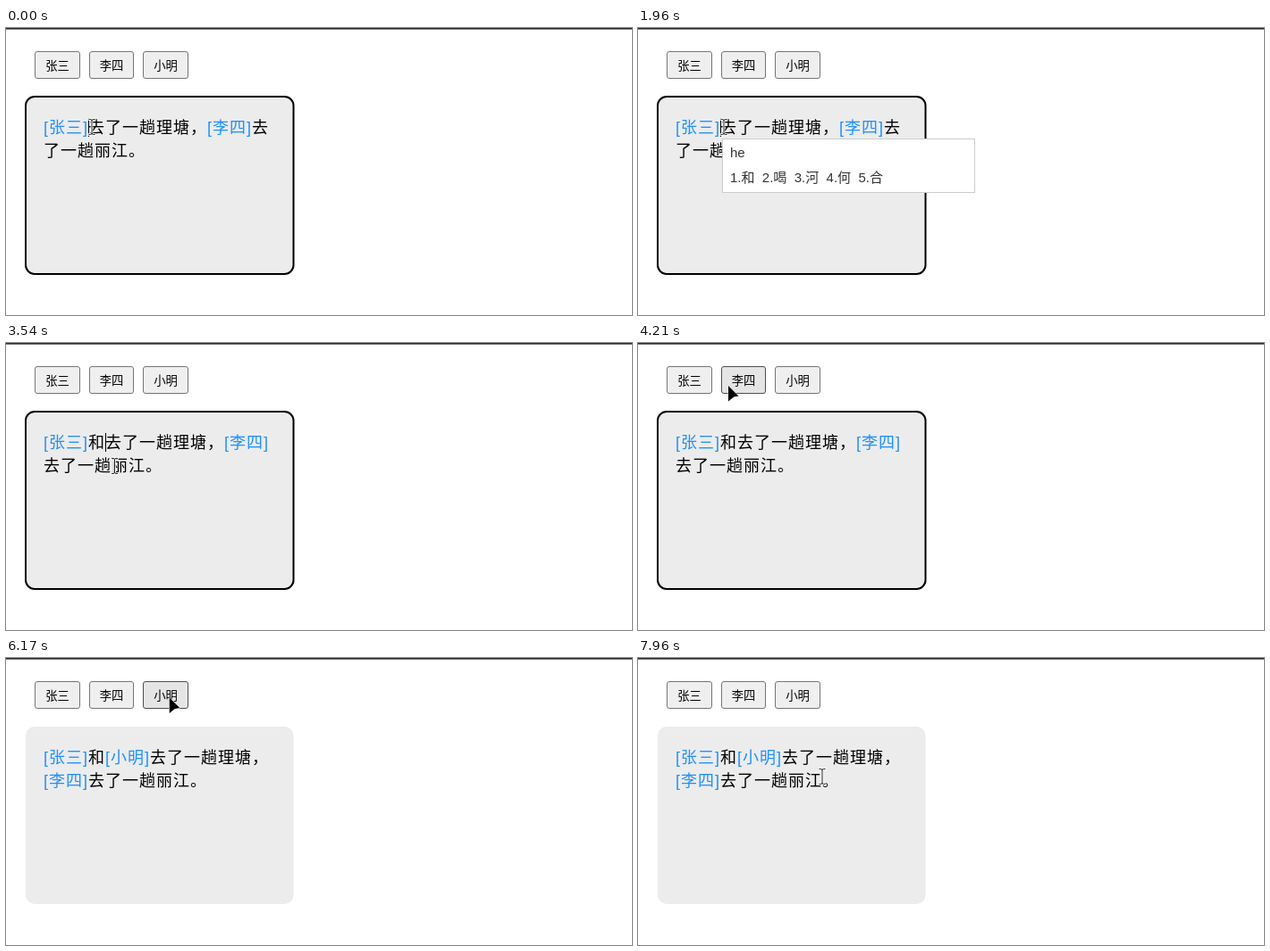
An HTML page for the animation above (8 s loop, 700 by 322 pixels).

```html
<!DOCTYPE html>
<html lang="zh-CN">
<head>
<meta charset="utf-8">
<title>Mention editor</title>
<style>
  html, body { margin: 0; width: 100%; height: 100%; overflow: hidden; background: #fff; }
  svg { display: block; width: 700px; height: 322px; }
  text { font-family: "Liberation Sans", "Noto Sans CJK SC", "Noto Sans CJK", sans-serif; white-space: pre; }
  .line { font-size: 18px; letter-spacing: 1px; fill: #000; }
  .mention { fill: #1e90ff; }
  .button text { font-size: 13.333px; text-anchor: middle; }
  .ime text { font-size: 15px; fill: #333; }
</style>
</head>
<body>
<svg id="stage" viewBox="0 0 700 322">
  <rect width="700" height="322" fill="#fff"/>
  <rect width="700" height="1.6" fill="#2b2b2b"/>
  <g id="buttons"></g>
  <rect id="editor" x="22" y="77" width="299.5" height="199" rx="10" fill="#ececec" stroke="#000" stroke-width="2"/>
  <text id="line1" class="line" x="42" y="117.5"></text>
  <text id="line2" class="line" x="42" y="143.5"></text>
  <rect id="caret" y="101" width="1" height="21"/>
  <g id="ime" class="ime">
    <rect id="panel" x="94.5" y="124.5" height="60" fill="#fff" stroke="#ccc"/>
    <text id="pinyin" x="103" y="145"></text>
    <text id="choices" x="103" y="173"></text>
  </g>
  <g id="beam" fill="none" stroke-linecap="square">
    <path d="M-3-8.5H-1.5Q0-8.5 0-7Q0-8.5 1.5-8.5H3M0-7V7M-3 8.5H-1.5Q0 8.5 0 7Q0 8.5 1.5 8.5H3" stroke="#fff" stroke-width="2.6"/>
    <path d="M-3-8.5H-1.5Q0-8.5 0-7Q0-8.5 1.5-8.5H3M0-7V7M-3 8.5H-1.5Q0 8.5 0 7Q0 8.5 1.5 8.5H3" stroke="#222" stroke-width="1"/>
  </g>
  <path id="arrow" d="M0 0L11.5 11.5L6 12.5L0 17.5Z" fill="#000" stroke="#fff" stroke-width="1" paint-order="stroke"/>
</svg>
<script>
const LOOP = 8000;
const IME_OPEN = 1600, IME_NEXT = 1850, COMMIT = 2300, BLUR = 5930, INSERT = 6010;
const $ = id => document.getElementById(id);

const buttons = [["张三", 32, 51], ["李四", 93, 50], ["小明", 153, 51]].map(([name, x, w]) => {
  const g = document.createElementNS("http://www.w3.org/2000/svg", "g");
  g.setAttribute("class", "button");
  g.innerHTML = `<rect x="${x + .5}" y="26.5" width="${w - 1}" height="30" rx="2.5"/>
    <text x="${x + w / 2}" y="47">${name}</text>`;
  $("buttons").append(g);
  return { x, w, box: g.firstElementChild };
});

// time, x, y of the pointer
const path = [
  [0, 96, 111], [3420, 96, 111], [3760, 184, 204], [4190, 101, 48],
  [4650, 101, 48], [5040, 118, 46], [5260, 196, 42], [5440, 181, 38],
  [6100, 181, 38], [6680, 223, 198], [7050, 223, 198],
  [7480, 216, 194], [7940, 206, 133], [LOOP, 206, 133]
];

function pointer(t) {
  const i = Math.max(1, path.findIndex(p => p[0] > t));
  const [t0, x0, y0] = path[i - 1], [t1, x1, y1] = path[i];
  const u = (t - t0) / (t1 - t0), e = u * u * (3 - 2 * u);
  return [x0 + (x1 - x0) * e, y0 + (y1 - y0) * e];
}

function setLine(id, source) {
  const node = $(id);
  if (node.dataset.source === source) return;
  node.dataset.source = source;
  node.innerHTML = source.replace(/\[.*?\]/g, m => `<tspan class="mention">${m}</tspan>`);
}

const show = (id, on) => $(id).setAttribute("visibility", on ? "visible" : "hidden");

function lines(t) {
  if (t < COMMIT) return ["[张三]去了一趟理塘，[李四]去", "了一趟丽江。"];
  if (t < INSERT) return ["[张三]和去了一趟理塘，[李四]", "去了一趟丽江。"];
  return ["[张三]和[小明]去了一趟理塘，", "[李四]去了一趟丽江。"];
}

function drawCaret(t) {
  const typing = t >= IME_OPEN && t < COMMIT;
  const phase = t < COMMIT ? t + 200 : t - COMMIT;
  $("caret").setAttribute("x", t < COMMIT ? 92 : 111);
  show("caret", t < BLUR && (typing || phase % 1000 < 500));
}

function drawIme(t) {
  const first = t < IME_NEXT;
  show("ime", t >= IME_OPEN && t < COMMIT);
  $("panel").setAttribute("width", first ? 296 : 282);
  $("pinyin").textContent = first ? "h" : "he";
  $("choices").textContent = first
    ? "1.好  2.和  3.会  4.还  5.后"
    : "1.和  2.喝  3.河  4.何  5.合";
}

function drawPointer(t) {
  const [x, y] = pointer(t);
  const overText = x > 21 && x < 322 && y > 76 && y < 277;
  for (const id of ["beam", "arrow"]) $(id).setAttribute("transform", `translate(${x} ${y})`);
  show("beam", overText);
  show("arrow", !overText);
  for (const b of buttons) {
    const hover = x >= b.x && x <= b.x + b.w && y >= 26 && y <= 57;
    b.box.setAttribute("fill", hover ? "#e5e5e5" : "#efefef");
    b.box.setAttribute("stroke", hover ? "#4f4f4f" : "#767676");
  }
}

function render(t) {
  const [a, b] = lines(t);
  setLine("line1", a);
  setLine("line2", b);
  $("editor").setAttribute("stroke", t < BLUR ? "#000" : "none");
  drawCaret(t);
  drawIme(t);
  drawPointer(t);
}

const start = performance.now();
function tick(now) {
  render(Math.max(0, now - start) % LOOP);
  requestAnimationFrame(tick);
}
render(0);
requestAnimationFrame(tick);
</script>
</body>
</html>
```
